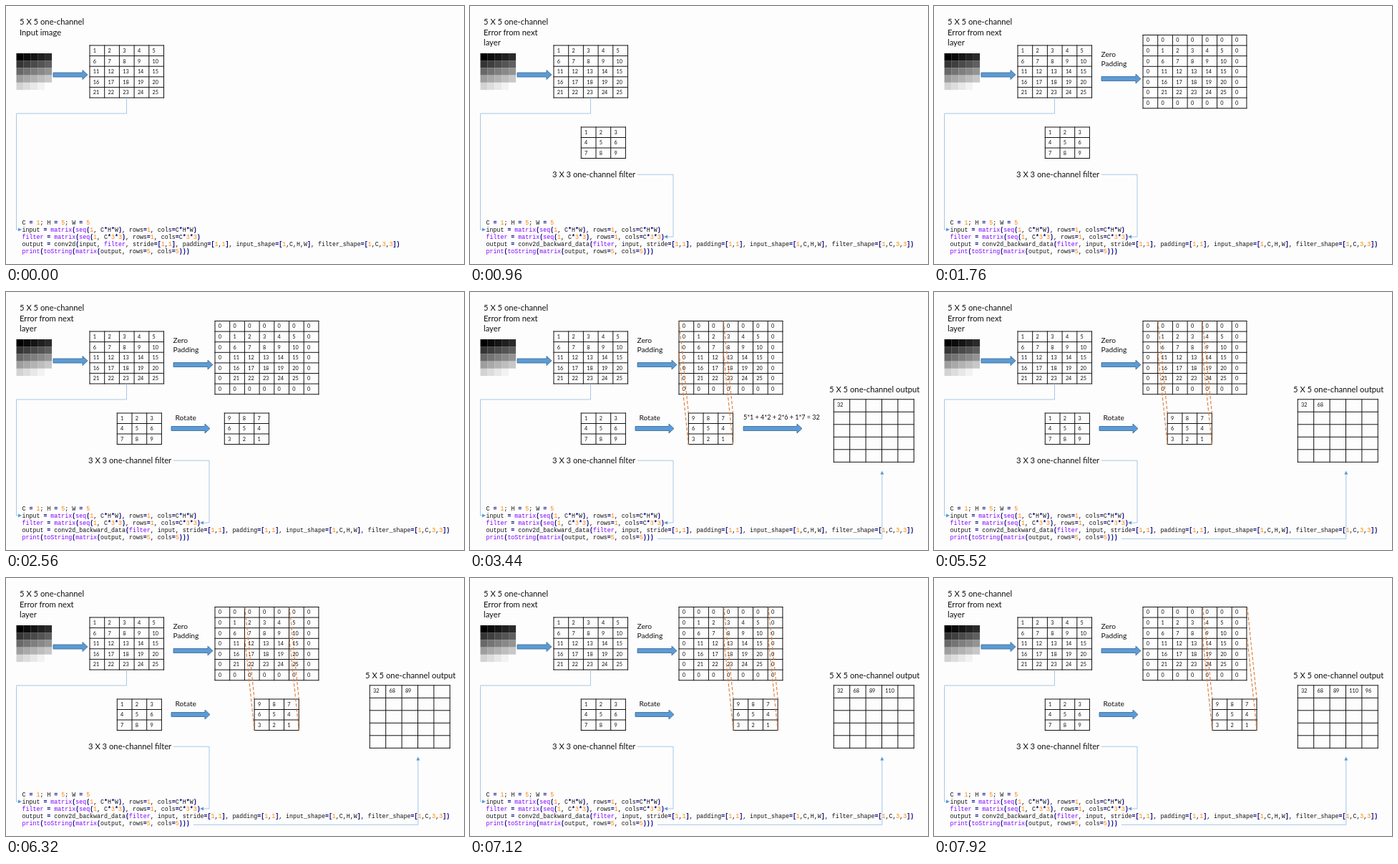
An HTML page that plays this animation: 640 px wide and 360 px high, repeating every 8 s.

```html
<!DOCTYPE html>
<html lang="en">
<head>
<meta charset="utf-8">
<title>Convolution backward pass</title>
<style>
  html, body { margin: 0; width: 100%; height: 100%; overflow: hidden; background: #fdfdfd; }
  svg { display: block; width: 100vw; height: 100vh; }
  text { font-family: Lato, Carlito, sans-serif; fill: #111; white-space: pre; }
  .code { font: 8.3px "Liberation Mono", "Courier New", monospace; }
  .fn { fill: #8000ff; }
  .num { fill: #ff8000; }
  .op { fill: #000080; font-weight: bold; }
</style>
</head>
<body>
<svg id="stage" viewBox="0 0 640 360"></svg>
<script>
const LOOP = 8000;
const SVG_NS = "http://www.w3.org/2000/svg";
const stage = document.getElementById("stage");

function add(parent, tag, attrs = {}, content = "") {
  const node = document.createElementNS(SVG_NS, tag);
  for (const key in attrs) node.setAttribute(key, attrs[key]);
  node.textContent = content;
  parent.appendChild(node);
  return node;
}

const group = () => add(stage, "g");
const label = (parent, x, y, size, content) =>
  add(parent, "text", { x, y, "font-size": size }, content);

function grid(parent, x, y, cols, rows, w, h, valueAt) {
  let d = "";
  for (let c = 0; c <= cols; c++) d += `M${x + c * w} ${y}v${rows * h}`;
  for (let r = 0; r <= rows; r++) d += `M${x} ${y + r * h}h${cols * w}`;
  add(parent, "path", { d, fill: "none", stroke: "#111", "stroke-width": 1, "stroke-linecap": "square" });
  const cells = [];
  for (let r = 0; r < rows; r++)
    for (let c = 0; c < cols; c++)
      cells.push(label(parent, x + c * w + 4.8, y + r * h + 9.9, 7.3, valueAt(c, r)));
  return cells;
}

function blockArrow(parent, x, y, length) {
  add(parent, "path", {
    d: `M${x} ${y - 3}h${length - 7}v-3.5l7 6.5l-7 6.5v-3.5h${7 - length}z`,
    fill: "#5b9bd5", stroke: "#41719c", "stroke-width": 0.9
  });
}

function connector(parent, path, tip) {
  add(parent, "path", { d: path, fill: "none", stroke: "#8fbbe3", "stroke-width": 0.8 });
  add(parent, "path", { d: tip, fill: "#5b9bd5" });
}

function codeLine(parent, y, source) {
  const line = add(parent, "text", { x: 22.5, y, class: "code" });
  const tokens = source.match(/[A-Za-z_]\w*|\d+|[=()[\]*]|[^\w=()[\]*]+/g);
  for (const token of tokens) {
    let kind = "";
    if (/^(matrix|seq|filter|print|toString)$/.test(token)) kind = "fn";
    else if (/^\d/.test(token)) kind = "num";
    else if (/^[=()[\]*]$/.test(token)) kind = "op";
    add(line, "tspan", { class: kind }, token);
  }
}

// Input image, its matrix and the code
const base = group();
label(base, 19, 26, 11.25, "5 X 5 one-channel");
for (let i = 0; i < 25; i++) {
  const shade = Math.round(i / 24 * 253);
  add(base, "rect", {
    x: 14.5 + (i % 5) * 9.9, y: 66 + Math.floor(i / 5) * 10.2, width: 10, height: 10.3,
    fill: `rgb(${shade},${shade},${shade})`
  });
}
blockArrow(base, 66, 96, 48);
grid(base, 117, 55, 5, 5, 20.7, 14.6, (c, r) => r * 5 + c + 1);
connector(base, "M168.5 128V150H14.5V312H18", "M17 309.5l5 2.5l-5 2.5z");
codeLine(base, 305, "C = 1; H = 5; W = 5");
codeLine(base, 315.2, "input = matrix(seq(1, C*H*W), rows=1, cols=C*H*W)");
codeLine(base, 325.3, "filter = matrix(seq(1, C*3*3), rows=1, cols=C*3*3)");
codeLine(base, 345.4, "print(toString(matrix(output, rows=5, cols=5)))");

const shapes = "stride=[1,1], padding=[1,1], input_shape=[1,C,H,W], filter_shape=[1,C,3,3])";
const forward = group();
label(forward, 19, 40.5, 11.25, "Input image");
codeLine(forward, 335.3, "output = conv2d(input, filter, " + shapes);

const backward = group();
label(backward, 19, 40.5, 11.25, "Error from next");
label(backward, 19, 55, 11.25, "layer");
codeLine(backward, 335.3, "output = conv2d_backward_data(filter, input, " + shapes);

const filter = group();
grid(filter, 155.3, 169, 3, 3, 20.7, 14.5, (c, r) => r * 3 + c + 1);
label(filter, 115, 239, 11.25, "3 X 3 one-channel filter");
connector(filter, "M234 235.2H284V322H275", "M276 319.5l-5 2.5l5 2.5z");

const padding = group();
label(padding, 233.5, 71, 10.2, "Zero");
label(padding, 233.5, 83.5, 10.2, "Padding");
blockArrow(padding, 234, 101.5, 55);
grid(padding, 292, 40.5, 7, 7, 20.7, 14.6, (c, r) =>
  c % 6 && r % 6 ? (r - 1) * 5 + c : 0);

const rotate = group();
label(rotate, 236.5, 179, 10.2, "Rotate");
blockArrow(rotate, 231, 190.5, 54);

// Rotated filter and its projection lines slide together
const kernel = group();
grid(kernel, 305.3, 169, 3, 3, 20.7, 14.5, (c, r) => 9 - r * 3 - c);
const projection = add(kernel, "path", {
  d: [0, 62.2].map(dx => [0, 44].map(dy =>
    `M${292 + dx} ${40.5 + dy}L${305.3 + dx} ${169 + dy}`).join("")).join(""),
  fill: "none", stroke: "#dc7a38", "stroke-width": 1.1, "stroke-dasharray": "4.5 2.5"
});

const formula = group();
label(formula, 382, 177.5, 9, "5*1 + 4*2 + 2*6 + 1*7 = 32");
blockArrow(formula, 382, 190.5, 82);

const output = group();
label(output, 502, 139.5, 11.25, "5 X 5 one-channel output");
const results = [32, 68, 89, 110, 96];
const cells = grid(output, 508.3, 149.8, 5, 5, 22.4, 17.5, (c, r) => r ? "" : results[c]);
connector(output, "M262 344.3H575.8V253", "M573.3 254.5l2.5-5l2.5 5z");

const show = (node, on) => node.setAttribute("visibility", on ? "visible" : "hidden");
const slides = [5040, 5840, 6640, 7520];

function render(t) {
  const step = slides.filter(start => t >= start).length;
  const convolving = t >= 3440;
  show(filter, t >= 80);
  show(forward, t < 960);
  show(backward, t >= 960);
  show(padding, t >= 1760);
  show(rotate, t >= 2560);
  show(kernel, t >= 2560);
  show(projection, convolving);
  show(formula, convolving && step === 0);
  show(output, convolving);
  cells.slice(0, 5).forEach((cell, i) => show(cell, convolving && i <= step));
  kernel.setAttribute("transform", `translate(${step * 20.9} 0)`);
}

const startTime = performance.now();
function tick() {
  render((performance.now() - startTime) % LOOP);
  requestAnimationFrame(tick);
}
render(0);
requestAnimationFrame(tick);
</script>
</body>
</html>
```
